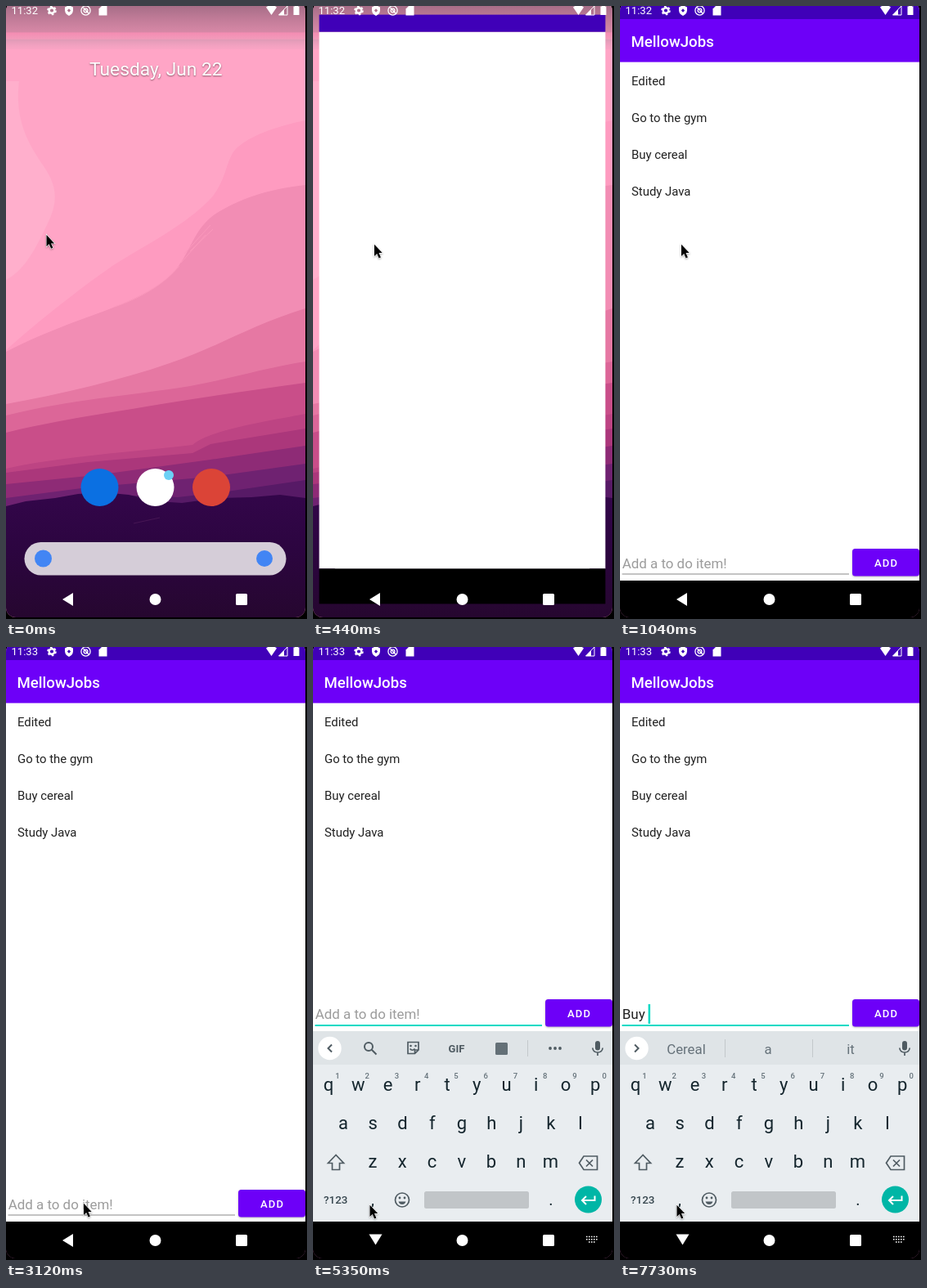
An HTML page that plays this animation: 368x750 px, repeating every 8 s.

```html
<!DOCTYPE html>
<html lang="en">
<head>
<meta charset="utf-8">
<title>To-do list demo</title>
<style>
  html, body { margin: 0; height: 100%; overflow: hidden; background: #000; }
  svg { display: block; width: 368px; height: 750px; }
  text { font-family: Roboto, Arial, sans-serif; white-space: pre; }
  .mid { text-anchor: middle; }
  .bold { font-weight: 500; }
  .line { fill: none; stroke: #4f5b62; stroke-width: 2; }
  .thin { stroke-width: 1.7; }
  .field { font-size: 16.9px; }
</style>
</head>
<body>
<svg viewBox="0 0 368 750">
  <defs>
    <clipPath id="screen"><rect y="-6" width="366" height="754" rx="12"/></clipPath>
    <linearGradient id="topShade" x2="0" y2="1">
      <stop offset="0" stop-color="#84586f" stop-opacity=".72"/>
      <stop offset=".6" stop-color="#a4647f" stop-opacity=".45"/>
      <stop offset=".62" stop-color="#e8749f" stop-opacity=".5"/>
      <stop offset=".76" stop-color="#e58fae" stop-opacity=".5"/>
      <stop offset=".78" stop-color="#c090a8" stop-opacity=".5"/>
      <stop offset="1" stop-color="#e9a0bd" stop-opacity=".25"/>
    </linearGradient>
    <linearGradient id="ground" x2="0" y2="1">
      <stop offset="0" stop-color="#33064a"/>
      <stop offset=".45" stop-color="#2c0540"/>
      <stop offset="1" stop-color="#26072f"/>
    </linearGradient>
  </defs>

  <g clip-path="url(#screen)">
    <g id="home">
      <rect width="366" height="750" fill="#ffa5c6"/>
      <path fill="#ffafcc" d="M0 92H16C10 140 28 170 46 196C66 225 62 245 48 272C34 302 20 325 0 335Z"/>
      <path fill="#fe9bc0" d="M366 140C335 146 290 160 277 180C268 196 268 215 250 236C215 272 165 295 130 318C90 346 40 385 0 421V480H366Z"/>
      <path fill="#f28db4" d="M366 219C320 224 285 236 255 255C230 273 228 296 208 322C188 346 150 362 118 374C80 388 40 402 0 423V500H366Z"/>
      <path fill="none" stroke="#fb98bc" d="M133 368Q185 350 212 318M218 303L250 268M214 314L244 280M225 300L253 273"/>
      <path fill="#e678a3" d="M366 370C300 390 260 417 200 437C140 458 70 474 0 487V540H366Z"/>
      <path fill="#dc6698" d="M366 435C320 442 270 457 225 465C150 477 80 481 0 501V560H366Z"/>
      <path fill="#c94e89" d="M366 461C310 469 250 477 190 487C120 499 60 507 0 522V590H366Z"/>
      <path fill="#bd4483" d="M366 499C320 508 250 518 228 537C160 545 60 552 0 566V600H366Z"/>
      <path fill="#ab377b" d="M366 517L250 536 228 547 100 558 0 571V620H366Z"/>
      <path fill="#8e2b76" d="M366 538L250 555 110 574 0 585V620H366Z"/>
      <path fill="#6f2271" d="M366 560L250 576 100 589 0 602V640H366Z"/>
      <path fill="#571a66" d="M366 580L270 594 210 601 130 598V640H366Z"/>
      <path fill="url(#ground)" d="M0 612L24 606 60 602 88 597 118 595 150 598 185 606 215 608 260 602 300 601 335 598 366 602V750H0Z"/>
      <path fill="none" stroke="#471654" d="M156 633L188 626"/>
      <rect width="366" height="53" fill="url(#topShade)"/>
      <text class="mid" x="183.3" y="84.5" font-size="22.75" fill="#fff" style="text-shadow:0 1px 2px #0007">Tuesday, Jun 22</text>
      <circle cx="114.5" cy="589" r="23" fill="#0b70e2"/>
      <circle cx="182.5" cy="589" r="23" fill="#fff"/>
      <circle cx="199" cy="574" r="6" fill="#6cd0f5"/>
      <circle cx="251" cy="589" r="23" fill="#db4437"/>
      <rect x="22.5" y="656" width="320" height="40.5" rx="20.2" fill="#d5cdd8"/>
      <circle cx="45.5" cy="676" r="10.5" fill="#4285f4"/>
      <circle cx="316" cy="676" r="10" fill="#4285f4"/>
    </g>

    <g id="app">
      <rect y="16" width="366" height="687" fill="#fff"/>
      <rect y="-6" width="366" height="22" fill="#4000b8"/>
      <rect y="703" width="366" height="45"/>
      <g id="content">
        <rect y="16" width="366" height="52.6" fill="#6d00f8"/>
        <text class="bold" x="13.5" y="50" font-size="18.64" fill="#fff">MellowJobs</text>
        <g id="list" font-size="14.9" fill="#212121"></g>
        <g id="entry">
          <text id="hint" class="field" x="2.8" y="688" fill="#9c9c9c">Add a to do item!</text>
          <text id="typed" class="field" x="2.8" y="688" fill="#212121"></text>
          <rect id="underline" x="2.5" width="277.5"/>
          <rect id="caret" y="670" width="2.5" height="24" fill="#03dac5"/>
          <rect x="284" y="664" width="82" height="33.6" rx="3.5" fill="#6d00f8" style="filter:drop-shadow(0 1px 1px #0004)"/>
          <text class="mid bold" x="325.5" y="686" font-size="13.05" letter-spacing="1.17" fill="#fff">ADD</text>
        </g>
      </g>
    </g>

    <g id="keyboard">
      <rect y="470" width="366" height="233" fill="#e9edf0"/>
      <rect y="470" width="366" height="41" fill="#dfe4e7"/>
      <g id="keys" class="mid" fill="#14252d"></g>
      <text class="bold" x="13" y="681" font-size="13.4" fill="#37474f">?123</text>
      <circle class="line thin" cx="109" cy="676.5" r="8.5"/>
      <path fill="#4f5b62" d="M104.500 678.500h9q-1.200 3.500-4.500 3.500t-4.500-3.500z"/>
      <circle cx="106" cy="674" r="1.400" fill="#4f5b62"/><circle cx="112" cy="674" r="1.400" fill="#4f5b62"/>
      <rect x="136" y="666" width="128" height="21" rx="2.5" fill="#c1c5c8"/>
      <circle cx="336.5" cy="676" r="16.5" fill="#00b6a6"/>
      <path class="line" d="M344.5 671.5V677H329.5M334 672L329 677 334 682" style="stroke:#fff"/>
      <path class="line thin" d="M28 621.5L18.5 631.5H23.5V639.5H32.5V631.5H37.5Z"/>
      <path class="line thin" d="M331 623H347.5V639.5H331L325.5 631.2ZM334 627.5L342 635.5M342 627.5L334 635.5"/>
      <circle cx="20.5" cy="491" r="14.2" fill="#fff"/>
      <path id="chevron" class="line" d="M23 486.5L18.5 491 23 495.5"/>
      <rect x="345" y="482" width="6" height="11.5" rx="3" fill="#4f5b62"/>
      <path class="line thin" d="M341.8 490.5Q342.5 496 348 496T354.2 490.5M348 496V500"/>
      <g id="tools">
        <circle class="line" cx="68" cy="489" r="5"/>
        <path class="line" d="M71.8 492.8L77.5 498.5"/>
        <path class="line thin" d="M116 483.500H129V493L124.500 497.500H116ZM129 493H124.500V497.500M118.500 491.500Q121.500 495 124.500 491.500"/>
        <circle cx="119.500" cy="488" r="1.300" fill="#4f5b62"/><circle cx="125.500" cy="488" r="1.300" fill="#4f5b62"/>
        <text class="mid" x="175.5" y="495.5" font-size="13" font-weight="700" fill="#4f5b62">GIF</text>
        <rect x="223" y="484" width="15" height="15" rx="1.5" fill="#647077"/>
        <path stroke="#c3c8cb" d="M262.5 481V501"/>
        <g fill="#4f5b62"><circle cx="290" cy="491" r="1.9"/><circle cx="296" cy="491" r="1.9"/><circle cx="302" cy="491" r="1.9"/></g>
      </g>
      <g id="words" class="mid" font-size="16.8" fill="#66727a">
        <path stroke="#c3c8cb" d="M128.5 480V502M235.5 480V502"/>
        <text x="81" y="497.5"></text><text x="181" y="497.5"></text><text x="282" y="497.5"></text>
      </g>
    </g>

    <g id="status" fill="#fff">
      <text id="clock" x="6.5" y="10" font-size="13.05"></text>
      <circle cx="56" cy="5.5" r="3.3" fill="none" stroke="#fff" stroke-width="2.4"/>
      <circle cx="56" cy="5.5" r="5" fill="none" stroke="#fff" stroke-width="1.6" stroke-dasharray="2.6 2.636"/>
      <path fill-rule="evenodd" d="M77 -1L82 1.5V5.5Q81.5 10 77 12Q72.5 10 72 5.5V1.5ZM77 3.2L74.8 5.5 77 7.8 79.2 5.5Z"/>
      <g fill="none" stroke="#fff" stroke-width="1.3"><circle cx="97.5" cy="5.5" r="5.6"/><circle cx="97.5" cy="5.5" r="2.4"/><path d="M94.5 2L101.5 9.5"/></g>
      <path d="M117 0H123.5V11.5H113.5V3.5Z"/>
      <path d="M318 1.5Q324.5 -4 331 1.5L324.5 11Z"/>
      <path d="M344 0V11H333.5Z" fill="none" stroke="#fff"/><path d="M340 4.5V11H333.5Z"/>
      <path d="M353 -1H357V.5H358.5V11H351.5V.5H353Z"/>
    </g>

    <g id="nav" fill="#fff">
      <path id="back" d="M-7 0L6 -8V8Z"/>
      <circle cx="182.5" cy="726" r="7"/>
      <rect x="281" y="719" width="14" height="14" rx="1.5"/>
      <path id="kbIcon" fill="none" stroke="#fff" stroke-width="1.6" stroke-dasharray="1.6 1.4" d="M334 721.5H348.5M334 724.8H348.5M337 728H346"/>
    </g>
  </g>
  <path id="pointer" d="M0 0V14.2L3.2 11.2 5.6 16.8 7.9 15.8 5.5 10.400H9.700Z" stroke="#fff" stroke-width="1.1" paint-order="stroke" style="filter:drop-shadow(0 1px 1px #0005)"/>
</svg>

<script>
const LOOP = 8000;
const $ = id => document.getElementById(id);
const show = (id, on) => $(id).style.display = on ? '' : 'none';
const set = (id, name, value) => $(id).setAttribute(name, value);

// Latest value in a list of [start, value] pairs
const pick = (t, steps) => steps.reduce((v, [start, next]) => t >= start ? next : v, steps[0][1]);

const label = (parent, text, x, y, attrs = '') =>
  $(parent).insertAdjacentHTML('beforeend', `<text x="${x}" y="${y}" ${attrs}>${text}</text>`);

['Edited', 'Go to the gym', 'Buy cereal', 'Study Java'].forEach((s, i) => label('list', s, 14, 97 + 45 * i));
[['qwertyuiop', 19, 543], ['asdfghjkl', 37, 590], ['zxcvbnm', 73, 637]].forEach(([row, x, y]) =>
  [...row].forEach((c, i) => label('keys', c, x + 36.25 * i, y, 'font-size="22"')));
[...'1234567890'].forEach((c, i) =>
  label('keys', c, 30 + 36.25 * i, 527.5, 'font-size="9.5" class="bold" fill="#65727a"'));
label('keys', ',', 73, 683, 'font-size="20"');
label('keys', '.', 291, 683, 'font-size="20"');

const pointerPath = [
  [0, [49.5, 280]], [150, [75, 291.7]],
  [2080, [84, 325]], [2230, [104, 420]], [2380, [117, 530]],
  [2530, [114, 620]], [2670, [102, 670]], [2820, [95, 680.7]],
  [3570, [80, 682]], [3710, [69.5, 682.7]]
];
const blinks = [[0, false], [3420, true], [4310, false], [4750, true], [5350, false],
  [5800, true], [6250, false], [6840, true]];
const typing = [[0, ''], [7290, 'B'], [7440, 'Bu'], [7590, 'Buy'], [7730, 'Buy ']];
const guesses = { B: ['But', 'B', 'By'], Bu: ['But', 'Bu', 'Buy'], Buy: ['But', 'Buy', 'Buying'], 'Buy ': ['Cereal', 'a', 'it'] };
const rise = [[3710, [110, .25]], [3860, [27, .63]], [4010, [0, 1]]];
const backPose = [[0, [76, 726, 0]], [3710, [78, 725, -150]], [3860, [79, 723.7, -180]], [4010, [76.5, 724.5, -90]]];

function draw(t) {
  const focused = t >= 3420, raised = t >= 3710;
  const text = pick(t, typing);
  const [drop, alpha] = pick(t, rise);
  const [backX, backY, turn] = pick(t, backPose);

  show('app', t >= 440);
  set('app', 'transform', t < 590 ? 'translate(182.5 371.5) scale(.956) translate(-183 -371.5)' : '');
  set('content', 'opacity', pick(t, [[0, 0], [890, .6], [1040, 1]]));
  $('clock').textContent = t < 3120 ? '11:32' : '11:33';

  set('entry', 'transform', `translate(0 ${raised ? -233 : 0})`);
  set('underline', 'y', focused ? 695 : 694.5);
  set('underline', 'height', focused ? 2 : 1);
  set('underline', 'fill', focused ? '#03dac5' : '#8a8a8a');
  show('hint', !text);
  $('typed').textContent = text;
  show('caret', pick(t, blinks));
  set('caret', 'x', 2.5 + (text ? $('typed').getComputedTextLength() : 0));

  show('keyboard', raised);
  set('keyboard', 'transform', `translate(0 ${drop})`);
  set('keyboard', 'opacity', alpha);
  show('tools', !text);
  show('words', text);
  set('chevron', 'transform', text ? 'matrix(-1 0 0 1 41 0)' : '');
  $('words').querySelectorAll('text').forEach((el, i) => el.textContent = text ? guesses[text][i] : '');

  set('back', 'transform', `translate(${backX} ${backY}) rotate(${turn})`);
  show('kbIcon', t >= 3860);
  set('pointer', 'transform', `translate(${pick(t, pointerPath)})`);
}

const begin = performance.now();
function tick() {
  draw((performance.now() - begin) % LOOP);
  requestAnimationFrame(tick);
}
tick();
</script>
</body>
</html>
```
